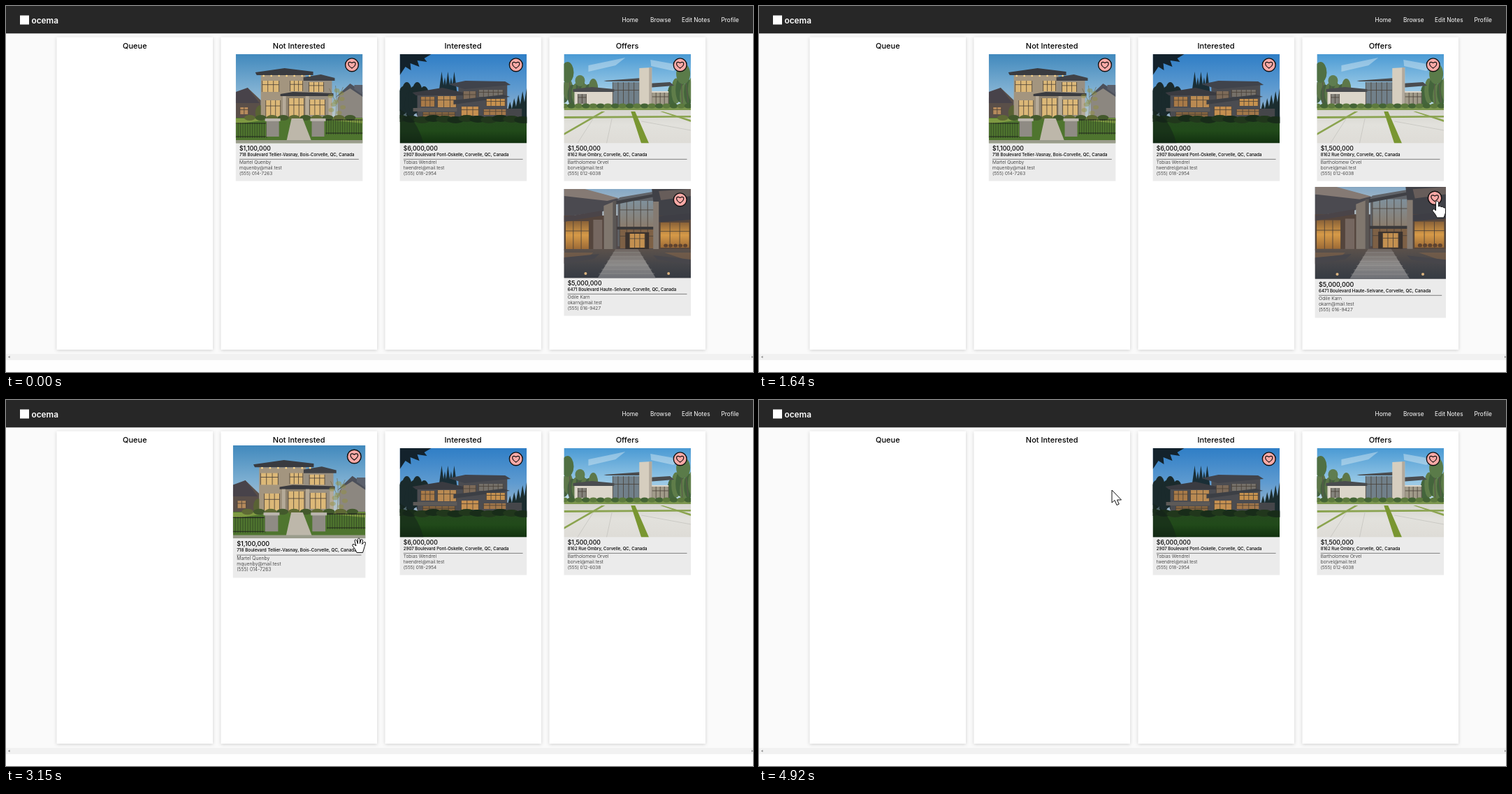
An HTML page for the animation above (4.98 s loop, 1069 by 524 pixels).

```html
<!DOCTYPE html>
<html lang="en">
<head>
<meta charset="utf-8">
<title>Listing board</title>
<style>
html, body { margin: 0; width: 100%; height: 100%; overflow: hidden; background: #fefefe; }
svg { display: block; }
text { font-family: Inter, "Open Sans", sans-serif; font-weight: 500; }
.column { filter: drop-shadow(0 1px 2.5px rgba(0, 0, 0, .17)); }
.regular { font-weight: 400; }
.light { font-weight: 300; }
.bold { font-weight: 600; }
</style>
</head>
<body>
<svg id="stage" width="1069" height="524" viewBox="0 0 1069 524"></svg>
<script>
const LOOP = 4980;
const CARD = 181.6;
const PHOTO = 127.3;

const rect = (x, y, w, h, fill) => `<rect x="${x}" y="${y}" width="${w}" height="${h}" fill="${fill}"/>`;
const shape = (d, fill) => `<path d="${d}" fill="${fill}"/>`;
const line = (d, color, width) => `<path d="${d}" fill="none" stroke="${color}" stroke-width="${width}"/>`;
const label = (x, y, size, value, extra = "") => `<text x="${x}" y="${y}" font-size="${size}" ${extra}>${value}</text>`;
const repeat = (n, make) => Array.from({ length: n }, (_, i) => make(i)).join("");
const pine = (x, top, w, bottom, fill) => shape(`M${x} ${top}L${x + w / 2} ${bottom}H${x - w / 2}Z`, fill);
const bush = (x, y, rx, ry, fill) => `<ellipse cx="${x}" cy="${y}" rx="${rx}" ry="${ry}" fill="${fill}"/>`;
const gradient = (id, ...colors) => `<linearGradient id="${id}" x2="0" y2="1">${
  colors.map((c, i) => `<stop offset="${i / (colors.length - 1)}" stop-color="${c}"/>`).join("")}</linearGradient>`;

// A lit window with dark glazing bars.
const pane = (x, y, w, h, bars = 2, fill = "#dcb878") => rect(x, y, w, h, fill) +
  line(repeat(bars + 1, i => `M${x + w * i / bars} ${y}v${h}`) + `M${x} ${y + h * .35}h${w}`, "#4a4038", .8);

const photos = {
  stone: () =>
    rect(0, 0, 182, 100, "url(#skyA)") +
    shape("M0 62L17 48L36 66V98H0Z", "#5a4f49") + shape("M0 54L17 48L34 70H0Z", "#48434a") +
    pane(6, 76, 12, 10, 2, "#b58a5c") +
    shape("M146 62L164 46L182 58V96H146Z", "#8c8780") + shape("M143 62L164 42L182 54V61L164 49Z", "#4c505a") +
    shape("M170 44H182V58L170 50Z", "#5b606b") +
    bush(35, 84, 7, 11, "#596234") +
    shape("M36 30H100V94H36Z", "#a3957f") + rect(98, 36, 40, 58, "#978f82") +
    rect(66, 58, 36, 36, "#8f8370") +
    shape("M28 26L70 20L111 25V30H30Z", "#393b40") + shape("M97 33L122 29L142 34V38H97Z", "#404247") +
    repeat(7, i => `<circle cx="${40 + i * 11}" cy="31" r="1.3" fill="#ffd98a"/>`) +
    pane(38, 38, 24, 16, 3) + pane(78, 38, 18, 15, 3) + pane(105, 40, 21, 14, 3) +
    shape("M64 57L82 54L140 56V60H64Z", "#3a3b40") +
    pane(43, 66, 21, 23, 3) + pane(76, 63, 22, 28, 3) + pane(106, 65, 22, 22, 3) +
    repeat(3, i => rect([67, 100, 133][i], 60, 5, 34, "#b5aa98")) +
    rect(0, 91, 182, 37, "#4f752f") + shape("M0 100L60 92H0ZM182 99L112 92H182Z", "#7f9a42") +
    repeat(10, i => bush(20 + i * 16, 91, 8, 4, i % 2 ? "#43592c" : "#5f6a35")) +
    shape("M80 92H96L110 128H72Z", "#bdb7aa") + rect(0, 123, 182, 5, "#9a9c8c") +
    line(repeat(14, i => `M${i * 3.4} 98v22`) + repeat(17, i => `M${130 + i * 3.3} 93v22`), "#20261daa", .7) +
    line("M0 99H43M0 118H43M129 94H182M129 113H182", "#20261d", 1) +
    repeat(2, i => rect(44 + i * 65, 95, 18, 23, "#8f8b84") + rect(42 + i * 65, 92, 22, 4, "#bab5ad")) +
    line("M143 92Q146 62 143 45M145 69L154 47M145 72L134 49", "#66582f99", .8) +
    repeat(9, i => bush(145 + Math.sin(i * 2.4) * 9, 52 + i * 4, 4, 3, "#92913c77")),

  night: () =>
    rect(0, 0, 182, 100, "url(#skyB)") +
    shape("M0 0H45L35 6L39 11L25 9L28 18L15 13L16 23L8 18L0 30Z", "#13222c") +
    repeat(8, i => bush(i * 5, 72 - i % 3 * 6, 8, 20, "#1a2a2c")) +
    repeat(5, i => pine(60 + i * 4.5, 25 + i % 2 * 8, 13, 72, "#1a2e36")) +
    repeat(5, i => pine(158 + i * 6, 68 - i * 5, 16, 99, "#1b2d2f")) +
    shape("M25 56H88V94H25ZM84 47L154 43V91H84Z", "#4b4c51") +
    shape("M18 55L61 48L91 55V59H23Z", "#3a3b41") + shape("M70 43L94 38L151 39L159 44L93 50Z", "#40434b") +
    pane(30, 61, 20, 14, 3, "#a87a48") + pane(54, 60, 27, 16, 3, "#b98a52") +
    pane(91, 53, 18, 14, 2, "#7d6a58") + pane(113, 51, 35, 10, 5, "#757069") +
    shape("M77 66L148 58L158 61L77 72Z", "#3c3f45") +
    pane(88, 75, 25, 13, 3, "#c48f50") + pane(124, 64, 27, 10, 4, "#c7924f") + pane(120, 79, 35, 8, 4, "#a3774a") +
    shape("M19 77H82V82H19Z", "#5d5a58") + pane(33, 83, 46, 9, 5, "#86653f") +
    rect(152, 78, 23, 14, "#45464a") +
    rect(0, 91, 182, 37, "url(#lawn)") +
    repeat(12, i => bush(i * 16, 92 + i % 3, 12, 5, i % 2 ? "#182c19" : "#21371c")) +
    shape("M0 79Q24 91 34 128H0Z", "#13231a88"),

  drive: () =>
    rect(0, 0, 182, 90, "url(#skyC)") +
    shape("M35 16L88 5L74 16L35 25ZM124 8L169 16L157 24L125 17Z", "#e8f2f666") +
    repeat(8, i => bush(i * 6, 55 - Math.sin(i * 2) * 5, 7, 15, i % 2 ? "#5d7749" : "#456140")) +
    repeat(6, i => bush(155 + i * 6, 55 + Math.cos(i * 2) * 6, 7, 18, i % 2 ? "#5f7d49" : "#44653c")) +
    line("M8 80Q10 36 5 18M19 75L22 31M170 77L168 30M178 69L174 31", "#5b5a4a", 1.2) +
    bush(5, 26, 9, 15, "#507043") + bush(171, 28, 10, 15, "#5a7b49") + bush(23, 38, 7, 8, "#5f7d50") +
    rect(15, 53, 135, 23, "#dcd6ca") + pane(70, 40, 38, 33, 5, "#71808a") +
    pane(126, 55, 24, 17, 4, "#a19b8a") + pane(20, 57, 12, 14, 2, "#83817a") +
    shape("M13 50L40 47L72 50V54H13ZM57 38L112 34V39H61ZM120 42L152 40L158 45L120 48Z", "#4a4c4f") +
    shape("M108 20L126 19V75H108Z", "#d6cebf") + rect(122, 19, 4, 56, "#b2aa9d") +
    rect(0, 74, 182, 54, "url(#paving)") +
    rect(0, 75, 182, 5, "#7c964e") +
    repeat(18, i => bush(i * 10.5, 74, 6, 3.5, i % 2 ? "#446435" : "#5d7a3e")) +
    shape("M0 89L182 88V90.5L0 92Z", "#8aa350") +
    shape("M96 82H102L122 128H111Z", "#799631") +
    shape("M54 82L59 82L0 116V113ZM138 82H142L182 94V97Z", "#8ba44f") +
    line("M42 92L19 128M111 96L182 109M69 91L61 128", "#c6c4bf", .8),

  dusk: () =>
    rect(0, 0, 182, 128, "#51494a") + rect(0, 0, 182, 38, "url(#skyD)") +
    shape("M0 10L50 6L86 16L56 32L0 40Z", "#4b4a50") + shape("M0 0H30L78 13L62 17L0 10Z", "#857a74") +
    shape("M80 12L133 3V82H77V15Z", "#606368") +
    pane(80, 17, 50, 37, 5, "url(#glass)") + pane(80, 58, 50, 27, 5, "#7d6045") +
    shape("M75 17L140 5V9L75 22Z", "#3f4045") + rect(76, 54, 58, 4, "#3c3a3b") +
    rect(88, 62, 34, 24, "#3a322e") + pane(94, 64, 22, 20, 3, "#c39050") +
    shape("M57 24L74 17V88H57Z", "#80776e") + rect(70, 17, 5, 71, "#5a5654") +
    rect(0, 38, 57, 50, "#54453d") + pane(2, 46, 34, 40, 3, "url(#glow)") + rect(42, 44, 13, 44, "#756760") +
    shape("M0 40L55 31V38L0 47Z", "#4a4448") +
    shape("M126 0H182V44H131Z", "#404147") + shape("M136 3L182 0V10L139 16Z", "#675d5a") +
    shape("M136 38H182V91H136Z", "#58473c") + pane(138, 48, 42, 36, 3, "url(#glow)") +
    shape("M131 39L182 35V44L131 48Z", "#3e3e45") + rect(128, 18, 8, 68, "#857b72") +
    repeat(5, i => bush(146 + i * 7, 81, 3, 2.5, "#5e4330")) +
    rect(0, 86, 182, 42, "url(#water)") +
    shape("M0 91H42L32 100L0 106ZM144 91H182V104Z", "#8f694877") +
    shape("M74 86H106L132 128H48Z", "url(#steps)") +
    repeat(6, i => line(`M${70 - i * 4} ${91 + i * 6}H${110 + i * 4}`, "#a4a19f88", .8)) +
    shape("M0 98L51 93L43 100L0 107ZM128 95L182 101V108L134 101Z", "#47464b") +
    repeat(2, i => `<circle cx="${31 + i * 119}" cy="121" r="2" fill="#d9b27e"/>`)
};

const heart = "M0 4.8C-8.5-1-4.8-6.6 0-2.7C4.8-6.6 8.5-1 0 4.8Z";

function card({ id, x, y, photo, price, address, contact }) {
  return `<g id="${id}"><g transform="translate(${x} ${y})">
    ${rect(0, 0, CARD, CARD, "#ebebeb")}
    <svg width="${CARD}" height="${PHOTO}" viewBox="0 0 182 127.3" preserveAspectRatio="none">${photos[photo]()}</svg>
    ${label(5.2, 138, 8.7, price)}
    ${label(5.2, 145.8, 6.1, address)}
    ${line("M5.2 150.4H176", "#666", .8)}
    ${contact.map((s, i) => label(5.2, 157.1 + i * 7.8, 6.6, s, 'class="light" fill="#222"')).join("")}
    <g transform="translate(166.2 15.3)"><g class="like" stroke="#111">
      <circle r="9.4" fill="#ffaaa7" stroke-width="1.4"/>
      <path d="${heart}" fill="none" stroke-width="1.2"/></g></g>
  </g></g>`;
}

const cards = [
  { id: "first", x: 328.8, y: 69, photo: "stone", price: "$1,100,000",
    address: "718 Boulevard Tellier-Vasnay, Bois-Corvelle, QC, Canada",
    contact: ["Martel Quenby", "mquenby@mail.test", "(555) 014-7263"] },
  { id: "second", x: 563.6, y: 69, photo: "night", price: "$6,000,000",
    address: "2907 Boulevard Pont-Oskelle, Corvelle, QC, Canada",
    contact: ["Tobias Wendrel", "twendrel@mail.test", "(555) 018-2954"] },
  { id: "third", x: 798.5, y: 69, photo: "drive", price: "$1,500,000",
    address: "8162 Rue Ombry, Corvelle, QC, Canada",
    contact: ["Bartholomew Orvel", "borvel@mail.test", "(555) 012-6038"] },
  { id: "fourth", x: 798.5, y: 262, photo: "dusk", price: "$5,000,000",
    address: "6471 Boulevard Haute-Selvane, Corvelle, QC, Canada",
    contact: ["Odile Karn", "okarn@mail.test", "(555) 016-9427"] }
];

const cursors = {
  arrow: "M0 0V18L4 14.5L7 21.5L10.3 20L7.5 14H13.5Z",
  point: "M-2 2Q0-1.5 2 2V8Q4 6.5 5.5 8.5Q7.5 7.5 9 9.5Q11.5 9 12 11.5V17Q11 20 9.5 24H-.5Q-1 21-6.5 14.5Q-7 11-4 12L-2 14Z",
  grab: "M-3 10.5Q-5 5-9 1Q-10-2-7-1.5L-4 1L-6-6Q-6-9-3.5-7.5L-1.5-2V-9Q0-11.5 1.5-9V-2.5L3-8Q5-9.5 5.5-7L4.5-1.5L7.5-4.5Q10-5 9.5-2.5Q8 2 7.5 4L5.5 10.5Z"
};

const stage = document.getElementById("stage");
stage.innerHTML = `<defs>
  ${gradient("skyA", "#4189bd", "#7fb0d2", "#c9cbc6")}${gradient("skyB", "#2f7ec6", "#5f9bd0", "#a9bac8")}
  ${gradient("skyC", "#4a9ad4", "#93c5e4", "#dceaf0")}${gradient("skyD", "#86a9c6", "#b7c3ca")}
  ${gradient("lawn", "#26491f", "#214a1a", "#11300f")}${gradient("water", "#5b514b", "#454549", "#353a42")}
  ${gradient("paving", "#d3d2cb", "#e2e1dc", "#dedcd7")}${gradient("glass", "#7f909b", "#8a7c6d")}
  ${gradient("glow", "#8a6238", "#d69a48", "#9c6a36")}${gradient("steps", "#6f6661", "#8b8988", "#6d6f75")}
  </defs>` +
  rect(0, 0, 1069, 524, "#fefefe") + rect(0, 39, 1069, 459, "#fafafa") +
  rect(0, 0, 1069, 39.3, "#272727") + rect(20, 13.5, 13, 13, "#fff") +
  label(36.5, 24.5, 11.8, "ocema", 'class="bold" fill="#fff"') +
  [["Home", 881.5], ["Browse", 922], ["Edit Notes", 967], ["Profile", 1023.5]]
    .map(([s, x]) => label(x, 22.8, 8.4, s, 'class="regular" fill="#fff"')).join("") +
  ["Queue", "Not Interested", "Interested", "Offers"].map((s, i) =>
    `<g class="column">${rect(72.5 + i * 235, 44.7, 223.5, 447.3, "#fff")}</g>` +
    label(184.3 + i * 234.9, 60.5, 11, s, 'text-anchor="middle"')).join("") +
  rect(0, 498, 1069, 9, "#f1f1f1") + shape("M3 502.5L5.5 500.7V504.3ZM1069 502.5L1067 500.7V504.3Z", "#8b8b8b") +
  cards.map(card).join("") +
  '<path id="cursor" fill="#fff" stroke="#111" stroke-width="1" stroke-linejoin="round"/>';

const [first, fourth, cursor] = ["first", "fourth", "cursor"].map(id => document.getElementById(id));
const like = first.querySelector(".like");

// Bursts of screen updates: start, end, number of steps.
const bursts = [[0, 0, 1], [460, 800, 6], [1010, 1490, 8], [1570, 2050, 8], [2250, 2450, 4],
  [2780, 3280, 8], [3350, 3840, 8], [3970, 4040, 2], [4310, 4310, 1], [4710, 4920, 4]];

// Pointer path: time, x, y.
const path = [[460, 1061, 512], [600, 1047, 430], [800, 1034.5, 363.5], [1010, 1031, 359], [1250, 1005, 325],
  [1490, 974, 292], [1638, 970.5, 279], [2050, 970.5, 279], [2250, 880, 284], [2317, 748.5, 295.5],
  [2383, 700, 306], [2450, 676.5, 311], [2780, 645, 298], [2851, 570, 262], [2923, 508, 228],
  [3137, 505, 208], [3280, 505, 180], [3350, 505, 145], [3490, 505, 92], [3560, 505, 83],
  [4310, 505, 83], [4710, 497, 94], [4780, 493.5, 108], [4850, 499, 121], [4920, 505, 129]];

const kinds = [[0, "arrow"], [1480, "grab"], [1565, "point"], [2240, "arrow"],
  [2870, "grab"], [3415, "point"], [4700, "arrow"]];

const latest = (list, t) => list.filter(([start]) => start <= t).pop();

function snap(t) {
  const [start, end, count] = latest(bursts, t);
  if (count === 1) return start;
  const step = (end - start) / (count - 1);
  return start + Math.min(count - 1, Math.floor((t - start) / step)) * step;
}

function position(t) {
  const i = path.findIndex(([time]) => time >= t);
  if (i < 0) return path[path.length - 1].slice(1);
  if (i === 0) return path[0].slice(1);
  const [t0, x0, y0] = path[i - 1], [t1, x1, y1] = path[i];
  const p = (t - t0) / (t1 - t0);
  return [x0 + (x1 - x0) * p, y0 + (y1 - y0) * p];
}

function hover(node, { x, y }, t, start, removed) {
  const p = Math.max(0, Math.min(1, (t - start) / 430));
  const scale = 1 + .05 * (1 - (1 - p) ** 2.2);
  const cx = x + CARD / 2, cy = y + CARD / 2;
  node.setAttribute("transform", `translate(${cx} ${cy}) scale(${scale}) translate(${-cx} ${-cy})`);
  node.style.display = t >= removed ? "none" : "";
}

function render(now) {
  const t = snap(now % LOOP);
  hover(first, cards[0], t, 2870, 4310);
  hover(fourth, cards[3], t, 1480, 2380);
  like.setAttribute("transform", t >= 3970 && t < 4040 ? "scale(1.1)" : "");
  cursor.style.display = t < 460 ? "none" : "";
  cursor.setAttribute("d", cursors[latest(kinds, t)[1]]);
  cursor.setAttribute("transform", `translate(${position(t)})`);
}

const begin = performance.now();
function tick() {
  render(performance.now() - begin);
  requestAnimationFrame(tick);
}
tick();
</script>
</body>
</html>
```
